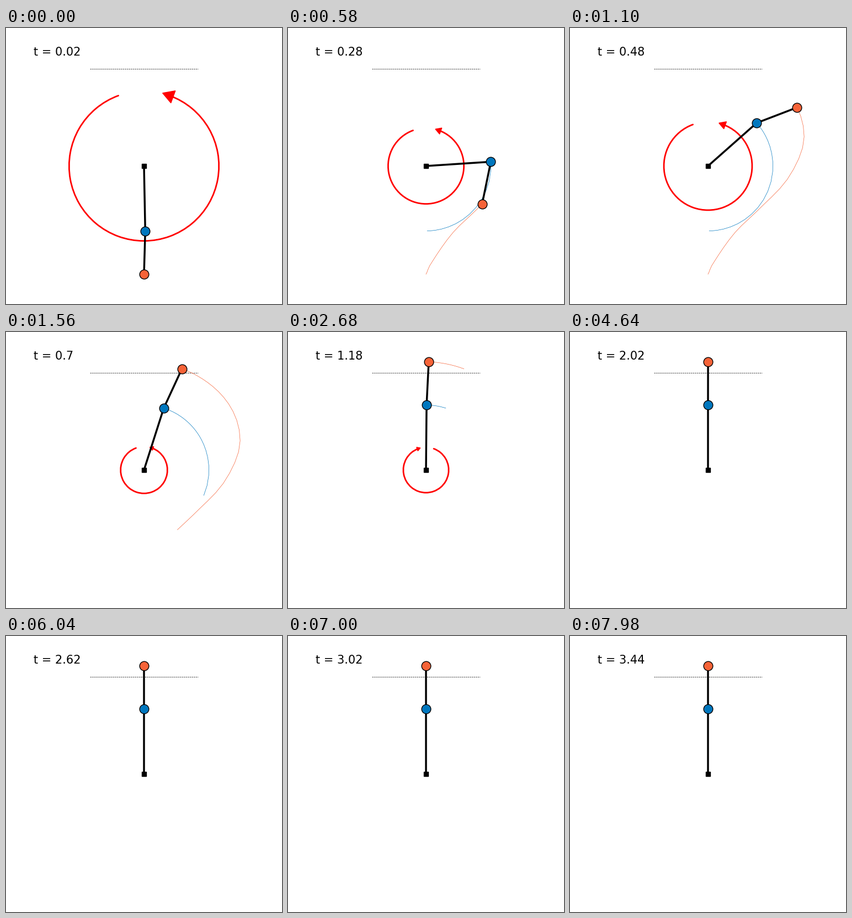
A matplotlib script that plays this animation: 500 px wide and 500 px high, repeating every 8000 ms.

```python
import numpy as np
import matplotlib.pyplot as plt
from matplotlib.animation import FuncAnimation
from matplotlib.patches import Arc, RegularPolygon

L1, L2 = 0.3, 0.2
DT = 0.02
TRAIL = 25
BLUE, ORANGE = "#0077be", "#f66338"

# Key poses of the swing-up: time, then the angle of each link (0 hangs, 180 upright)
POSES = np.array([(0, 0, 0), (.06, 8.3, -11.4), (.10, 20.4, -26), (.22, 67, -37.5),
                  (.28, 93.75, -11.6), (.36, 117.4, 40.1), (.427, 125.3, 84.1),
                  (.58, 144, 143.8), (.70, 162.3, 155.2)])
# Motor torque at the shoulder: time, value
PUSHES = np.array([(0, 4.9), (.1, 5), (.28, 1.5), (.42, 2.6), (.7, .16), (.8, -.27)])


def spline(t, xs, ys):
    """Cubic Hermite curve through the key points, starting at rest."""
    slope = np.gradient(ys, xs)
    slope[0] = 0
    k = np.clip(np.searchsorted(xs, t, side="right") - 1, 0, len(xs) - 2)
    h = xs[k + 1] - xs[k]
    u = (t - xs[k]) / h
    return ((1 + 2 * u) * (1 - u) ** 2 * ys[k] + u * (1 - u) ** 2 * h * slope[k]
            + u * u * (3 - 2 * u) * ys[k + 1] + u * u * (u - 1) * h * slope[k + 1])


def link_angle(t, column, rate):
    """Swing through the key poses, then settle exponentially upright."""
    xs, ys = POSES[:, 0], POSES[:, column]
    swing = spline(np.minimum(t, xs[-1]), xs, ys)
    settle = 180 - (180 - ys[-1]) * np.exp(-rate * (t - xs[-1]))
    return np.radians(np.where(t < xs[-1], swing, settle))


def shoulder_torque(t):
    end, last = PUSHES[-1]
    return np.where(t < end, np.interp(t, *PUSHES.T), last * np.exp(-2.75 * (t - end)))


def tip(angle, length):
    return length * np.column_stack([np.sin(angle), -np.cos(angle)])


times = DT * np.arange(1, 173)
elbow = tip(link_angle(times, 1, 7.4), L1)
hand = elbow + tip(link_angle(times, 2, 4.5), L2)
torque = shoulder_torque(times)

fig = plt.figure(figsize=(5, 5), dpi=100, facecolor="white")
ax = fig.add_axes([0, 0, 1, 1])
ax.set_xlim(-0.6375, 0.6375)
ax.set_ylim(-0.6375, 0.6375)
ax.axis("off")

arc = ax.add_patch(Arc((0, 0), 0.2, 0.2, angle=110, theta1=0, theta2=320,
                       lw=2, color="red", capstyle="round"))
head = ax.add_patch(RegularPolygon((0, 0), 3, radius=0.01, color="red"))
ax.plot([-0.25, 0.25], [0.45, 0.45], "--", color="black", lw=0.5)
trails = [ax.plot([], [], color=c, lw=0.5)[0] for c in (BLUE, ORANGE)]
rod, = ax.plot([], [], color="black", lw=2.5)
ax.plot([0], [0], "s", color="black", ms=5.5)
joints = [ax.plot([], [], "o", color=c, mec="black", mew=1, ms=12)[0]
          for c in (BLUE, ORANGE)]
clock = ax.text(0.1, 0.9, "", fontsize=15, family="DejaVu Sans",
                transform=ax.transAxes)


def set_arrow(tau):
    shown = abs(tau) >= 0.01
    arc.set_visible(shown)
    head.set_visible(shown)
    size = 0.2 + 0.1 * abs(tau)
    arc.width = arc.height = size
    end = np.radians(70 if tau > 0 else 110)
    head.xy = (size / 2 * np.cos(end), size / 2 * np.sin(end))
    head.radius = size / 20
    head.orientation = np.radians(70 if tau > 0 else -70)


def step_at(tick):
    """Three steps per seven ticks; the middle one is held for five."""
    block, rest = divmod(tick, 7)
    return 3 * block + (0 if rest == 0 else 1 if rest < 6 else 2)


def draw(tick):
    i = step_at(tick)
    start = max(0, i - TRAIL + 1)
    for path, trail, joint in zip((elbow, hand), trails, joints):
        trail.set_data(*path[start:i + 1].T)
        joint.set_data(*path[i:i + 1].T)
    rod.set_data([0, elbow[i, 0], hand[i, 0]], [0, elbow[i, 1], hand[i, 1]])
    set_arrow(torque[i])
    clock.set_text(f"t = {round(float(times[i]), 2)}")
    return [arc, head, rod, clock, *trails, *joints]


anim = FuncAnimation(fig, draw, frames=400, interval=20, repeat=True,
                     repeat_delay=0, blit=False)
plt.show()
```
